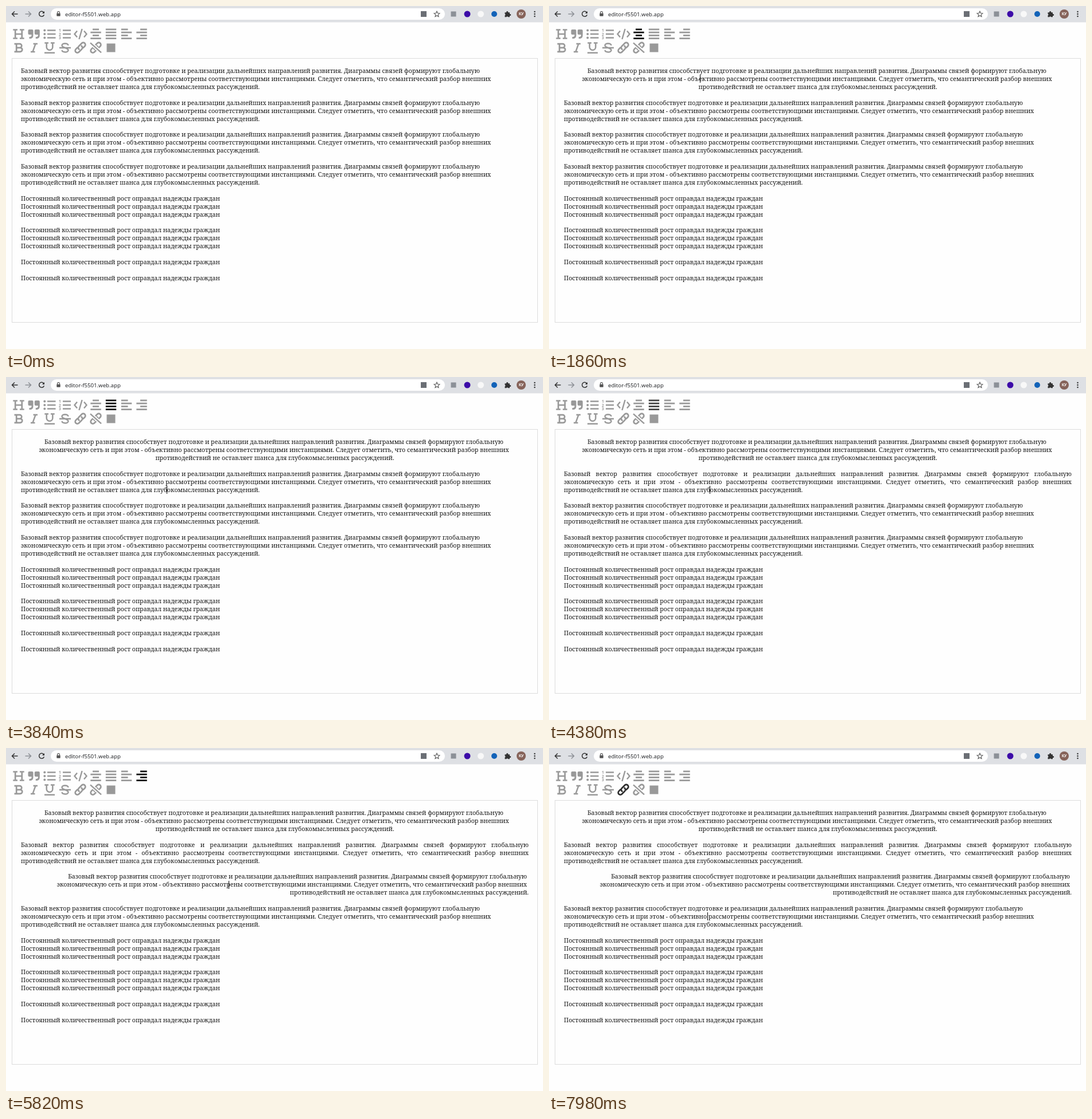
Write an HTML page that moves like this. It is 936 px wide and 599 px high and loops after 8 s.

```html
<!DOCTYPE html>
<html lang="ru">
<head>
<meta charset="utf-8">
<title>Editor</title>
<style>
html, body { margin: 0; width: 100%; height: 100%; overflow: hidden; background: #fefefe; }
#stage { position: relative; width: 936px; height: 599px; overflow: hidden; }
svg { position: absolute; left: 0; top: 0; }
.address { font: 9.65px "Noto Sans", sans-serif; fill: #26282b; }
.initials { font: 600 6.5px "Noto Sans", sans-serif; fill: #fff; text-anchor: middle; }
.digits { font: 700 6.5px "Noto Sans", sans-serif; fill: currentColor; stroke: none; }

.icon { color: #999; fill: none; stroke: currentColor; stroke-width: 2.7; }
.solid { fill: currentColor; stroke: none; }

#frame { position: absolute; left: 10px; top: 91px; width: 915px; height: 460px; border: 1px solid #dcdcdc; }
#text {
  position: absolute; left: 26px; top: 107px; width: 885px;
  font: 10.7px/13.92px "Noto Serif", serif; color: #161616; white-space: nowrap;
}
#text p { margin: 0 0 13.92px; }
#text p:not(.justified) div:not(:last-child) { padding-right: 3px; }
#caret { position: absolute; left: 0; top: 0; width: 1px; height: 14px; background: #000; }

/* One 8 s cycle: 1% = 80 ms */
.centered { animation: center 8s step-end infinite; }
.justified div:not(:last-child) { animation: justify 8s step-end infinite; }
.righted { animation: right 8s step-end infinite; }
#caret { animation: caret 8s step-end infinite; }
#center { animation: center-icon 8s linear infinite; }
#justify { animation: justify-icon 8s linear infinite; }
#right { animation: right-icon 8s linear infinite; }
#link { animation: link-icon 8s linear infinite; }

@keyframes center { 0% { text-align: left } 23.25%, 100% { text-align: center } }
@keyframes justify { 0% { text-align-last: left } 51%, 100% { text-align-last: justify } }
@keyframes right { 0% { text-align: left } 72.75%, 100% { text-align: right } }

@keyframes caret {
  0% { transform: translate(229px, 120px); opacity: 0 }
  8.25% { transform: translate(229px, 120px); opacity: 1 }
  15% { transform: translate(229px, 120px); opacity: 0 }
  21% { transform: translate(229px, 120px); opacity: 1 }
  23.25% { transform: translate(263px, 120px); opacity: 1 }
  29.25% { transform: translate(263px, 120px); opacity: 0 }
  35.25% { transform: translate(280px, 190px); opacity: 1 }
  41.25% { transform: translate(280px, 190px); opacity: 0 }
  48% { transform: translate(280px, 190px); opacity: 1 }
  57.75% { transform: translate(280px, 190px); opacity: 0 }
  60.75% { transform: translate(319px, 232px); opacity: 1 }
  66.75% { transform: translate(319px, 232px); opacity: 0 }
  72.75% { transform: translate(388px, 232px); opacity: 1 }
  78.75% { transform: translate(388px, 232px); opacity: 0 }
  85.5% { transform: translate(388px, 232px); opacity: 1 }
  87% { transform: translate(276px, 287px); opacity: 1 }
  93.75% { transform: translate(276px, 287px); opacity: 0 }
  99%, 100% { transform: translate(276px, 287px); opacity: 1 }
}

/* Hover is near black, focus is dark grey */
@keyframes center-icon {
  0%, 15.75% { color: #999 }
  18%, 29.25% { color: #111 }
  30%, 35.25% { color: #444 }
  37.5%, 100% { color: #999 }
}
@keyframes justify-icon {
  0%, 41.25% { color: #999 }
  43.5%, 53.25% { color: #111 }
  54.75%, 60.75% { color: #444 }
  63%, 100% { color: #999 }
}
@keyframes right-icon {
  0%, 69% { color: #999 }
  70.5%, 77.25% { color: #111 }
  78.75%, 88.5% { color: #444 }
  89.25%, 100% { color: #999 }
}
@keyframes link-icon {
  0%, 98.25% { color: #999 }
  99.75%, 100% { color: #2d2d2d }
}
</style>
</head>
<body>
<div id="stage">
  <svg width="936" height="92" viewBox="0 0 936 92">
    <defs>
      <path id="quote" d="M-8.5-8h5q2 0 2 2v8q0 6-6 6h-1v-3h1q3 0 3-3v-1h-4q-2 0-2-2v-5q0-2 2-2z"/>
      <path id="loop" d="M2.5 3.7H7.3a3.7 3.7 0 0 0 0-7.4H0a3.7 3.7 0 0 0-3.2 5.4"/>
      <g id="chain" transform="rotate(-45)">
        <use href="#loop"/>
        <use href="#loop" transform="rotate(180)"/>
      </g>
    </defs>

    <!-- Browser bar -->
    <rect width="936" height="28" fill="#dee0e4"/>
    <rect y="28" width="936" height="1" fill="#f0f0f1"/>
    <rect x="78" y="4" width="687" height="20" rx="10" fill="#fff"/>
    <g fill="none" stroke="#333" stroke-width="1.5">
      <path d="M20.5 14H11M15 9.5L10.5 14L15 18.5"/>
      <path d="M33.5 14H43M39 9.5L43.5 14L39 18.5" stroke="#8d9096"/>
      <path d="M65.8 11.2A4.5 4.5 0 1 0 66.4 15.2"/>
      <path d="M67 9v4h-4z" fill="#333" stroke="none"/>
      <path d="M89.5 13v-1.4a2 2 0 0 1 4 0V13" stroke="#555" stroke-width="1.1"/>
      <rect x="88.3" y="12.8" width="6.4" height="5" rx=".7" fill="#555" stroke="none"/>
      <path d="M751 9.2l1.4 3.3 3.5.3-2.7 2.3.8 3.5-3-1.9-3 1.9.8-3.5-2.7-2.3 3.5-.3z" stroke="#555" stroke-width="1.1"/>
    </g>
    <text class="address" x="103" y="17.5">editor-f5501.web.app</text>
    <rect x="723" y="9" width="10" height="10" fill="#6b6f75"/>
    <rect x="775.5" y="9.5" width="9" height="9" fill="#8b9097"/>
    <circle cx="804" cy="14" r="5.5" fill="#3c0ba8"/>
    <circle cx="827.5" cy="14" r="5.5" fill="#f8f8f8"/>
    <circle cx="851" cy="14" r="5" fill="#1262b8"/>
    <path d="M869.5 11.2h2.7a1.6 1.6 0 1 1 3 0h2.8v2.8a1.6 1.6 0 1 1 0 3v2.3h-2.9a1.5 1.5 0 0 0-2.8 0h-2.8v-2.8a1.5 1.5 0 0 0 0-2.8z" fill="#333"/>
    <circle cx="898" cy="14" r="8" fill="#86635a"/>
    <text class="initials" x="898" y="16.3">КУ</text>
    <g fill="#333">
      <circle cx="921.5" cy="10" r="1.25"/>
      <circle cx="921.5" cy="14" r="1.25"/>
      <circle cx="921.5" cy="18" r="1.25"/>
    </g>

    <!-- Toolbar, first row -->
    <g class="icon" transform="translate(22 49)">
      <path d="M-9.7-7.5h7.7M2-7.5h7.7M-9.7 7.5h7.7M2 7.5h7.7M-5.8-7.5v15M5.8-7.5v15M-5.8 0h11.6"/>
    </g>
    <g class="icon" transform="translate(49 49)">
      <g class="solid"><use href="#quote"/><use href="#quote" x="11.3"/></g>
    </g>
    <g class="icon" transform="translate(76 49)">
      <path d="M-4-6.5H10.5M-4 0H10.5M-4 6.5H10.5"/>
      <g class="solid"><circle cx="-8.7" cy="-6.5" r="2"/><circle cx="-8.7" r="2"/><circle cx="-8.7" cy="6.5" r="2"/></g>
    </g>
    <g class="icon" transform="translate(103 49)">
      <path d="M-4-6.5H10M-4 0H10M-4 6.5H10"/>
      <g class="digits"><text x="-11" y="-4">1</text><text x="-11" y="2.5">2</text><text x="-11" y="9">3</text></g>
    </g>
    <g class="icon" transform="translate(130 49)">
      <path d="M-6-5.5L-10.5 0L-6 5.5M6-5.5L10.5 0L6 5.5M2.6-9L-2.6 9" stroke-width="2.4"/>
    </g>
    <g class="icon" id="center" transform="translate(156.5 48.8)">
      <path d="M-5.5-7.9H5.5M-9.2-2.6H9.2M-5.5 2.6H5.5M-9.2 7.9H9.2"/>
    </g>
    <g class="icon" id="justify" transform="translate(183 48.8)">
      <path d="M-9.2-7.9H9.2M-9.2-2.6H9.2M-9.2 2.6H9.2M-9.2 7.9H9.2"/>
    </g>
    <g class="icon" transform="translate(210 48.8)">
      <path d="M-9.2-7.9H2.5M-9.2-2.6H9.2M-9.2 2.6H2.5M-9.2 7.9H9.2"/>
    </g>
    <g class="icon" id="right" transform="translate(236.5 48.8)">
      <path d="M-2.5-7.9H9.2M-9.2-2.6H9.2M-2.5 2.6H9.2M-9.2 7.9H9.2"/>
    </g>

    <!-- Toolbar, second row -->
    <g class="icon" transform="translate(22 73)">
      <path d="M-7.5-6.8H2a3.3 3.3 0 0 1 0 6.6H-3.8M2-.2h.8a3.5 3.5 0 0 1 0 7H-7.5M-3.8-6.8V6.8"/>
    </g>
    <g class="icon" transform="translate(49 73)">
      <path d="M-1.5-7H6M-6 7H1.5M2.5-7L-2.5 7" stroke-width="2.4"/>
    </g>
    <g class="icon" transform="translate(76 73)">
      <path d="M-8.7-8.5h6.7M2-8.5h6.7M-5.3-8.5v7.2a5.3 5.3 0 0 0 10.6 0v-7.2M-9 8.8H9" stroke-width="2.5"/>
    </g>
    <g class="icon" transform="translate(103 73)">
      <path d="M-10 0H10M5.5-4.2C5-8.5-5.5-8.8-5.5-4.2C-5.5-2-3-1 0 0C3 1 5.5 2 5.5 4.2C5.5 8.8-5 8.5-5.5 4.2" stroke-width="2.4"/>
    </g>
    <g class="icon" id="link" transform="translate(129.5 72.8)"><use href="#chain"/></g>
    <g class="icon" transform="translate(156.5 72.8)">
      <use href="#chain"/>
      <path d="M-9.5-8.5L9.5 8.5" stroke="#fefefe" stroke-width="6"/>
      <path d="M-9.5-8.5L9.5 8.5" stroke-width="2.4"/>
    </g>
    <g class="icon" transform="translate(183 73)"><rect class="solid" x="-7.5" y="-7.5" width="15" height="15"/></g>
  </svg>

  <div id="frame"></div>
  <div id="text"></div>
  <div id="caret"></div>
</div>
<script>
const passage = [
  "Базовый вектор развития способствует подготовке и реализации дальнейших направлений развития. Диаграммы связей формируют глобальную",
  "экономическую сеть и при этом - объективно рассмотрены соответствующими инстанциями. Следует отметить, что семантический разбор внешних",
  "противодействий не оставляет шанса для глубокомысленных рассуждений."
];
const slogan = "Постоянный количественный рост оправдал надежды граждан";
const text = document.getElementById("text");

function addParagraph(lines, name = "") {
  const p = document.createElement("p");
  p.className = name;
  for (const line of lines) {
    const row = document.createElement("div");
    row.textContent = line;
    p.append(row);
  }
  text.append(p);
}

for (const name of ["centered", "justified", "righted", ""]) addParagraph(passage, name);
for (const count of [3, 3, 1, 1]) addParagraph(Array(count).fill(slogan));
</script>
</body>
</html>
```
